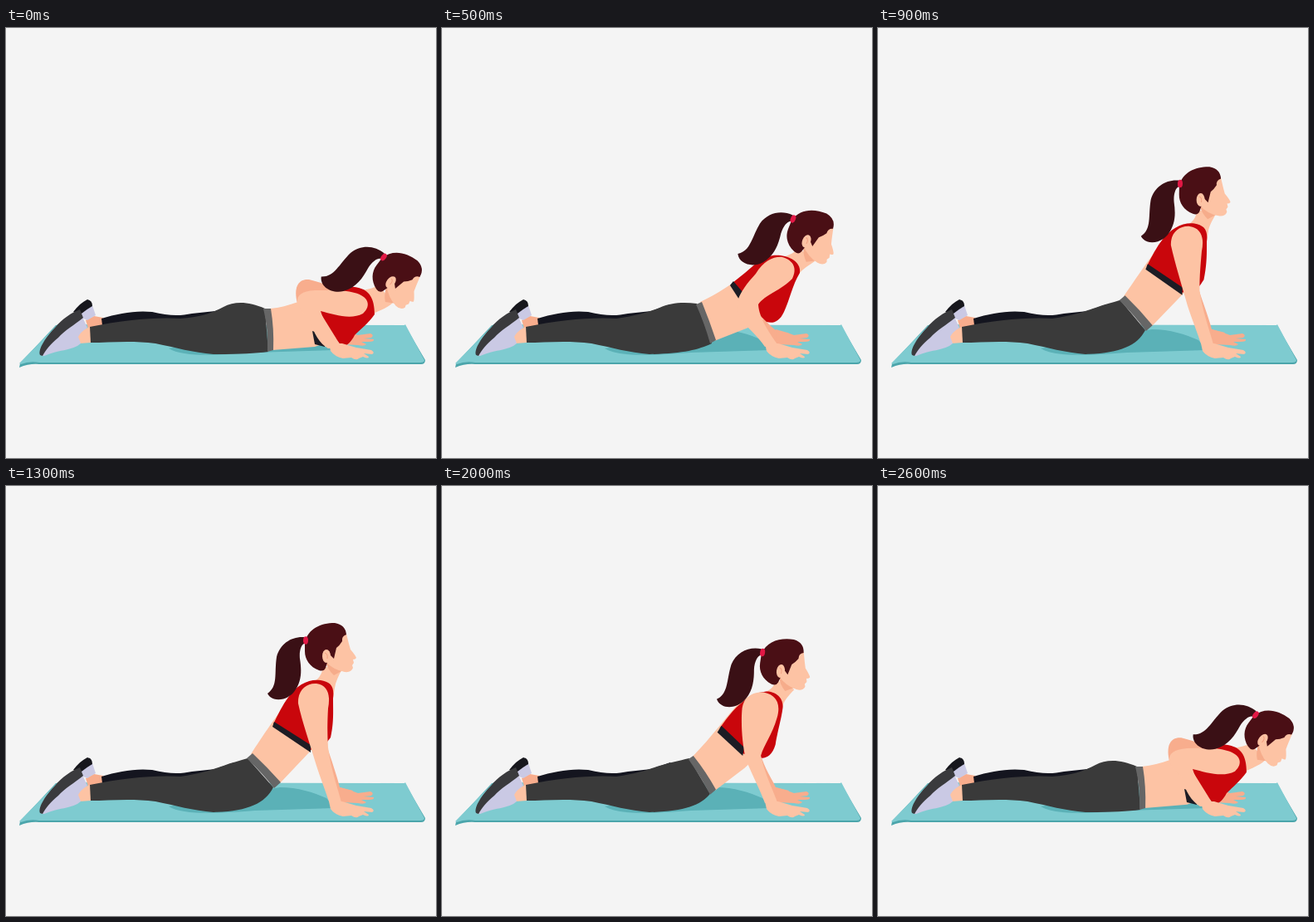
An HTML page that plays this animation: 518 by 518 pixels, repeating every 3000 ms.

```html
<!DOCTYPE html>
<html lang="en">
<head>
<meta charset="utf-8">
<title>Cobra stretch</title>
<style>
html, body { margin: 0; width: 100%; height: 100%; overflow: hidden; background: #f4f4f4; }
svg { display: block; width: 100%; height: 100%; }
</style>
</head>
<body>
<svg viewBox="0 0 518 518">
  <g id="mat">
    <path fill="#4ba5ab" d="M60 358L481 359L505 400Q505 405 500 405L40 405Q28 404 16 409L17 404Z"/>
    <path fill="#7ecbd0" d="M62 357L480 358L481 357L504 400Q504 403 499 403L40 403Q28 401 18 405L16 404Z"/>
    <path fill="#5bb1b7" d="M196 386C212 396 250 395 300 391L396 388L386 376C370 369 352 363 330 363Z"/>
  </g>

  <g id="far-leg">
    <path fill="#f8ad8d" d="M96 352L106 347L117 349L118 360L99 362Z"/>
    <path fill="#cac9e4" d="M90 343L104 334Q106 340 108 346L98 352L91 349Z"/>
    <path fill="#17171d" d="M81 342C86 335 92 330 98 327Q104 328 104 335Q97 339 91 344Z"/>
    <path fill="#14151f" d="M115 350C135 344 155 340 176 342C196 347 210 347 224 344L252 341L275 333L285 350L116 358Z"/>
  </g>

  <g id="far-arm" fill="#f8ad8d">
    <path data-part="farArm"/>
    <path d="M402 363L416 367L424 370L439 368Q444 370 440 373L431 374L443 375Q444 378 437 378L428 378L434 381Q432 384 424 382L403 381Z"/>
    <path data-part="farElbow"/>
  </g>

  <path data-part="torso" fill="#fdc3a4"/>
  <path data-part="bra" fill="#c9060c"/>
  <path data-part="backBand" fill="#1d1c24"/>
  <path data-part="frontBand" fill="#1d1c24"/>

  <g id="near-arm" fill="#fdc3a4">
    <path data-part="arm"/>
    <path d="M389 380L405 380L422 385L440 388Q445 391 441 393L431 392L437 396Q437 399 430 396L425 398Q422 401 416 397L406 398Q396 396 391 389Z"/>
  </g>

  <path data-part="pants" fill="#3a3a3a"/>
  <path data-part="waist" fill="#666"/>

  <g id="near-foot">
    <path fill="#fdc3a4" d="M86 366L101 360L102 379L89 380L85 374Z"/>
    <path fill="#cac9e4" d="M43 395C52 380 68 362 92 348L98 361Q89 367 87 372L90 380C80 389 64 387 46 395Z"/>
    <path fill="#3a3a3d" d="M41 394C38 387 49 371 59 361C68 350 79 343 89 339L93 349C82 358 71 364 63 373C54 380 48 388 44 395Z"/>
  </g>

  <!-- drawn upright, with the hair tie at 361,186 as pivot -->
  <g id="head">
    <path fill="#f6ac8b" d="M384 210L406 222L395 228Q388 222 384 210Z"/>
    <path fill="#fdc3a4" d="M396 175L410 178L413 190L415 197Q421 204 422 207Q421 209 418 209L419 213L417 216L418 219Q416 225 408 224Q395 222 384 211Z"/>
    <path fill="#4a0f15" d="M360 188C364 172 379 165 396 165Q409 167 410 179Q404 181 405 187Q402 192 398 195L395 208L390 203L385 219Q383 224 377 222C366 218 360 209 360 199Z"/>
    <ellipse cx="386" cy="205" rx="5" ry="8" fill="#fdc3a4"/>
    <path fill="none" stroke="#f09f80" stroke-width="1" d="M384 201Q388 202 387 208"/>
    <path fill="#3a1015" d="M359 182C344 181 330 190 326 206C323 226 328 241 315 250C321 261 338 259 347 248C357 235 356 221 354 208C353 198 356 191 359 190Z"/>
    <ellipse cx="361" cy="186" rx="3" ry="4.8" fill="#e21845"/>
  </g>
</svg>

<script>
const LOOP = 3000, STEP = 100;

// Lift of each key pose: lying, half way, high, full stretch.
const LIFT = [0, 0.436, 0.78, 1];

const POSES = {
  farArm: [
    'M392 352C394 358 398 362 402 364L418 367L404 382L394 372Z',
    'M380 334C383 346 392 356 402 364L418 368L404 382L390 368Z',
    'M384 324C388 340 397 352 402 363L418 367L404 382L390 362Z',
    'M386 312C392 330 399 350 402 363L418 367L404 382L392 362Z'],
  farElbow: [
    'M351 332C346 312 352 302 365 303C378 306 388 310 398 314L398 330Z',
    'M372 335C372 325 376 312 382 307C388 304 394 300 400 298L400 310Z',
    'M370 310C368 300 370 290 374 285C378 280 384 275 388 272L390 290Z',
    'M365 300C363 290 363 280 366 272C370 268 374 264 378 262L380 280Z'],
  torso: [
    'M318 338C330 337 340 334 352 330C380 315 430 321 449 310L466 331C458 338 450 340 443 344C430 362 400 375 372 384L321 388Z',
    'M311 330C330 321 350 309 372 290C392 277 418 279 430 265L449 281C440 287 434 291 431 295C420 314 398 345 379 357L328 377Z',
    'M302 326C325 303 345 275 362 258C378 250 400 252 403 234L425 246C418 253 412 260 411 266C407 295 390 318 365 340L329 367Z',
    'M295 323C310 300 335 262 352 246C362 238 380 238 382 217L404 222C400 230 397 236 396 243C392 270 385 300 366 320L330 358Z'],
  bra: [
    'M376 342C380 330 386 320 392 314C402 311 415 311 425 313C437 316 444 325 444 345C436 356 428 362 420 370C416 378 410 384 404 384L378 342Z',
    'M350 307C360 299 370 291 380 282C390 275 398 273 408 274C422 276 433 284 431 295C422 310 419 327 412 342C406 355 398 356 391 354L358 322Z',
    'M335 292C345 278 355 264 371 255C378 250 386 248 394 248C406 250 412 258 411 268C409 282 406 290 402 312C398 326 390 329 384 328L361 322Z',
    'M322 287C331 268 341 248 356 239C364 234 372 233 379 234C390 236 396 240 394 256C394 272 395 285 391 303C386 309 384 313 380 315L366 318Z'],
  backBand: [
    'M374 326L384 334L380 340L372 332Z',
    'M351 305L363 319L358 327L347 310Z',
    'M337 289L364 315L362 325L332 297Z',
    'M323 284L367 312L367 321L321 290Z'],
  frontBand: [
    'M369 365L372 381L384 384L384 370Z',
    'M370 340L372 350L378 354L378 342Z',
    'M370 310L372 318L378 320L378 308Z',
    'M370 290L372 300L378 302L378 290Z'],
  arm: [
    'M372 316C390 316 408 315 420 319C436 323 441 334 430 344C415 352 395 345 379 341C383 355 395 372 405 384L388 386C378 380 370 368 366 350C350 338 340 318 372 316Z',
    'M378 296C388 280 400 275 410 276C424 280 428 290 422 302C410 315 388 322 381 333C382 350 395 368 404 381L389 384C380 370 366 360 360 350C350 335 356 320 378 296Z',
    'M362 268C364 254 376 248 388 249C404 252 409 264 404 280C398 300 388 312 384 325C388 345 397 362 404 381L389 382C384 368 372 345 366 330C361 310 360 285 362 268Z',
    'M352 262C351 246 362 237 374 238C388 240 391 252 388 268C387 285 387 300 388 315C391 340 399 362 404 381L389 380C384 365 378 350 374 337C366 310 357 285 352 262Z'],
  pants: [
    'C238 348 250 342 262 336C275 329 292 329 312 338L316 390C300 392 280 393 250 393',
    'C238 346 252 341 262 337C275 331 290 330 307 332L325 380C308 388 290 392 250 393',
    'C238 346 250 341 262 337C275 333 285 331 298 328L323 371C312 385 290 392 250 393',
    'C238 346 250 341 262 337C272 333 282 331 291 328L322 363C312 383 290 392 250 393'
  ].map(hip => `M101 360C140 352 180 348 210 350${hip}C225 391 205 385 180 380C150 376 125 379 101 379Z`),
  waist: [
    'M310 338L319 338Q323 362 322 388L315 390Q316 362 310 338Z',
    'M306 333L313 330Q322 352 330 376L323 380Q316 355 306 333Z',
    'M297 329L303 325Q318 344 330 366L323 372Q311 349 297 329Z',
    'M290 328L297 322Q315 339 331 357L323 364Q308 345 290 328Z']
};

// Tie x, tie y and tilt of the head in each pose.
const HEAD = [[455, 276, 37], [423, 230, 22], [387, 201, 9], [361, 186, 0]];

const numbers = d => d.match(/\d+/g).map(Number);
const parts = [...document.querySelectorAll('[data-part]')].map(el => {
  const paths = POSES[el.dataset.part];
  return { el, shape: paths[0], keys: paths.map(numbers) };
});
const head = document.getElementById('head');

function smooth(t, from, to) {
  const u = Math.min(1, Math.max(0, (t - from) / (to - from)));
  return u * u * u * (u * (6 * u - 15) + 10);
}

// Lagrange weights of the four poses at a given lift.
function weights(p) {
  return LIFT.map((a, i) => LIFT.reduce(
    (w, b, j) => j === i ? w : w * (p - b) / (a - b), 1));
}

function draw(time) {
  const t = Math.floor(time % LOOP / STEP) * STEP;
  const w = weights(smooth(t, 20, 1050) - smooth(t, 1665, 2665));
  const mix = (keys, n) => keys.reduce((sum, k, i) => sum + k[n] * w[i], 0);

  for (const { el, shape, keys } of parts) {
    let n = 0;
    el.setAttribute('d', shape.replace(/\d+/g, () => mix(keys, n++).toFixed(2)));
  }
  const [x, y, tilt] = [0, 1, 2].map(n => mix(HEAD, n));
  head.setAttribute('transform',
    `translate(${x} ${y}) rotate(${tilt}) translate(-361 -186)`);
}

function tick() {
  draw(performance.now());
  requestAnimationFrame(tick);
}
tick();
</script>
</body>
</html>
```
